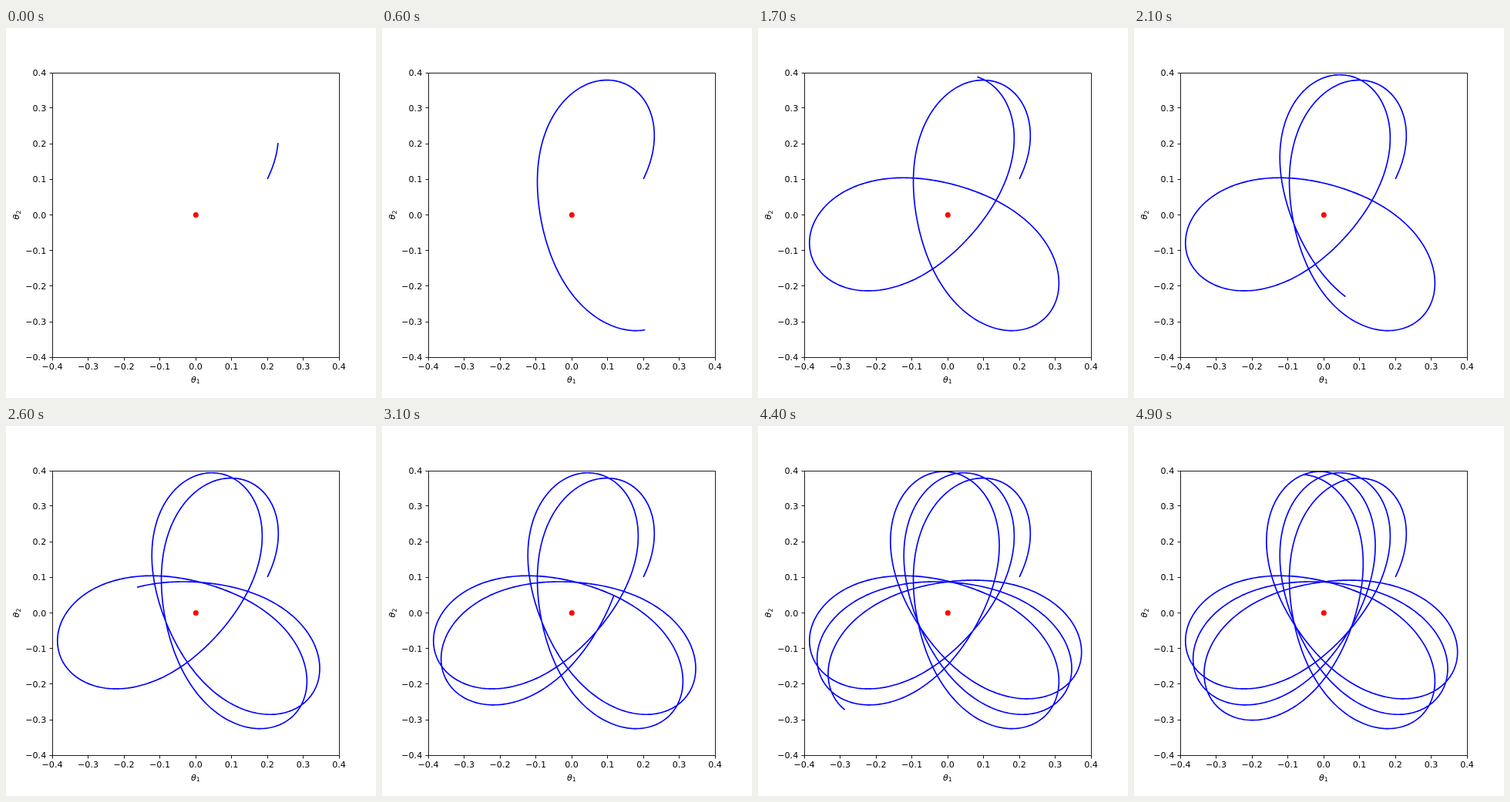
These frames come from a looping animation (480x480 px, 5 s). An HTML page with a canvas:

```html
<!DOCTYPE html>
<html>
<head>
<meta charset="utf-8">
<title>Phase orbit</title>
<style>
html, body { margin: 0; width: 100%; height: 100%; overflow: hidden; background: #fff; }
canvas { display: block; }
</style>
</head>
<body>
<canvas id="stage" width="480" height="480"></canvas>
<script>
const ctx = document.getElementById('stage').getContext('2d');
const DEG = Math.PI / 180;
const BOX = { left: 60, top: 57.6, width: 372, height: 369.6 };
const FONT = '"DejaVu Sans", sans-serif';
const STEP = 100, STEPS = 50;

// Radial phase in degrees: where the trail begins, first tip, advance per step
const BEGIN = -103.1, FIRST = -69.7, RATE = 67.24;
// Direction of the first far point and its turn per radial period
const APSIS = 68.85, TURN = 243.9;

const px = x => BOX.left + (x + 0.4) / 0.8 * BOX.width;
const py = y => BOX.top + (0.4 - y) / 0.8 * BOX.height;
const snap = v => Math.floor(v) + 0.5;

// Precessing orbit: a small ellipse carried around a circle
function orbit(phase) {
  const p = phase * DEG;
  const u = 0.2374 + 0.1553 * Math.cos(p) + 0.0043 * Math.cos(2 * p);
  const v = -0.108 * Math.sin(p) - 0.0025 * Math.sin(2 * p);
  const a = (APSIS + TURN * phase / 360) * DEG;
  const c = Math.cos(a), s = Math.sin(a);
  return [px(u * c - v * s), py(u * s + v * c)];
}

function line(x1, y1, x2, y2) {
  ctx.beginPath();
  ctx.moveTo(x1, y1);
  ctx.lineTo(x2, y2);
  ctx.stroke();
}

function theta(index, x, y, angle) {
  ctx.save();
  ctx.translate(x, y);
  ctx.rotate(angle);
  ctx.textAlign = 'left';
  ctx.font = 'italic 11.11px ' + FONT;
  ctx.fillText('θ', -6, 0);
  ctx.font = '7.78px ' + FONT;
  ctx.fillText(index, 0.8, 1.8);
  ctx.restore();
}

function drawAxes() {
  const l = snap(BOX.left), r = snap(BOX.left + BOX.width);
  const t = 58.5, b = snap(BOX.top + BOX.height);
  ctx.strokeStyle = ctx.fillStyle = '#000';
  ctx.lineWidth = 0.89;
  ctx.strokeRect(l, t, r - l, b - t);
  ctx.font = '11.11px ' + FONT;
  for (let i = -4; i <= 4; i++) {
    const label = (i < 0 ? '\u2212' : '') + Math.abs(i / 10).toFixed(1);
    const x = px(i / 10), y = py(i / 10);
    const ty = i === 4 ? t : snap(y);
    line(snap(x), b, snap(x), b + 4);
    line(l, ty, l - 4, ty);
    ctx.textAlign = 'center';
    ctx.fillText(label, x, 443.3);
    ctx.textAlign = 'right';
    ctx.fillText(label, 52.2, y + 4.2);
  }
  theta('1', 246, 459.5, 0);
  theta('2', 17, 242.4, -Math.PI / 2);
}

function drawTrail(end) {
  ctx.strokeStyle = '#00f';
  ctx.lineWidth = 1.67;
  ctx.lineJoin = 'round';
  ctx.beginPath();
  for (let p = BEGIN; p < end; p += 2) ctx.lineTo(...orbit(p));
  ctx.lineTo(...orbit(end));
  ctx.stroke();
}

function drawCentre() {
  ctx.fillStyle = '#f00';
  ctx.beginPath();
  ctx.arc(px(0) + 0.3, py(0), 3.5, 0, 2 * Math.PI);
  ctx.fill();
}

const start = performance.now();

function frame(now) {
  const n = Math.floor(Math.max(0, now - start) / STEP) % STEPS;
  ctx.fillStyle = '#fff';
  ctx.fillRect(0, 0, 480, 480);
  drawTrail(FIRST + RATE * n);
  drawCentre();
  drawAxes();
  requestAnimationFrame(frame);
}
frame(start);
</script>
</body>
</html>
```
